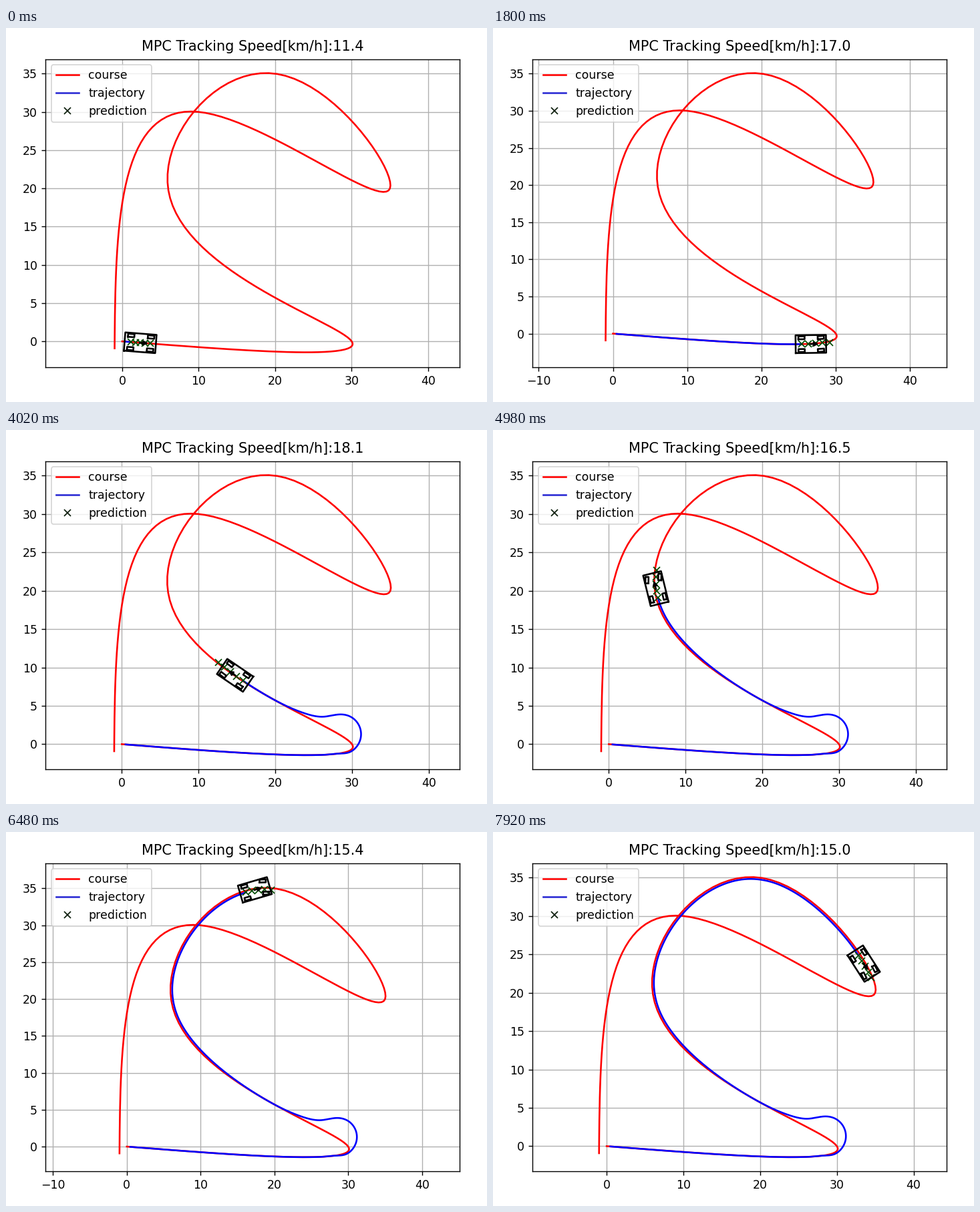
These frames come from a looping animation (720x560 px, 8 s). A matplotlib script:

```python
import numpy as np
import matplotlib.pyplot as plt
from matplotlib.animation import FuncAnimation

W, H, DPI = 720, 560, 125
LOOP, INTERVAL, STEP = 8000, 40, 60


def spline(points):
    """Natural cubic spline over the chord length; returns its length and evaluator."""
    p = np.asarray(points, float)
    h = np.hypot(*np.diff(p, axis=0).T)
    t = np.r_[0, np.cumsum(h)]
    n = len(p)
    a, b = np.eye(n), np.zeros((n, 2))
    slope = np.diff(p, axis=0) / h[:, None]
    for i in range(1, n - 1):
        a[i, i - 1:i + 2] = h[i - 1], 2 * (h[i - 1] + h[i]), h[i]
        b[i] = 6 * (slope[i] - slope[i - 1])
    m = np.linalg.solve(a, b)

    def at(s):
        i = np.clip(np.searchsorted(t, s) - 1, 0, n - 2)
        u, k = (s - t[i])[:, None], h[i][:, None]
        w = k - u
        bend = u * w / 6 * (m[i] * (1 + w / k) + m[i + 1] * (1 + u / k))
        return p[i] + slope[i] * u - bend

    return t[-1], at


# Reference course
length, course_at = spline([(0, 0), (30, 0), (6, 20), (20, 35),
                            (35, 20), (10, 30), (-1, -2)])
course = course_at(np.arange(0, length, 1.0))


def inside(s, gap):
    """Course points shifted to the right by gap."""
    d = course_at(s + 0.05) - course_at(s - 0.05)
    d /= np.hypot(*d.T)[:, None]
    return course_at(s) + gap[:, None] * np.c_[d[:, 1], -d[:, 0]]


# Driven path: along the course, a wide arc at the hairpin, then slightly inside
angle = np.radians(np.linspace(-65, 90, 7))
arc = np.array([28.6, 1.3]) + 2.58 * np.c_[np.cos(angle), np.sin(angle)]
s = np.arange(44, 110, 3.0)
ramp = np.clip((s - 44) / 12, 0, 1)
span, path_at = spline(np.vstack([course_at(np.arange(0.3, 23, 2)), arc,
                                  [(26.3, 3.58), (23.9, 4.0)],
                                  inside(s, 0.24 * ramp * ramp * (3 - 2 * ramp))]))
path = path_at(np.linspace(0, span, 4000))
dist = np.r_[0, np.cumsum(np.hypot(*np.diff(path, axis=0).T))]
yaw = np.unwrap(np.arctan2(*np.gradient(path, axis=0).T[::-1]))
bend = np.gradient(yaw, dist)

# Time in ms, cruising speed in km/h, place of the rear axle
KEYS = np.array([(0, 11.4, 1.13, -0.05), (900, 20.1, 11.38, -0.85),
                 (2700, 19, 30.77, 2.79), (4020, 18.1, 15.84, 8.36),
                 (6000, 14.9, 11.11, 31.73), (6960, 15.9, 21.99, 34.25),
                 (7920, 15.0, 32.97, 24.94)])
key_t, key_v = KEYS[:, 0], KEYS[:, 1]


def speed(t):
    """Cruising speed, with braking and recovery around the hairpin."""
    return np.minimum(np.interp(t, key_t, key_v), 7.59 + 0.0105 * np.abs(t - 2700))


clock = np.arange(0, LOOP + 1, 20)
travel = np.cumsum(speed(clock))
key_travel = np.interp(key_t, clock, travel)
key_dist = [dist[np.argmin(np.hypot(*(path - q).T))] for q in KEYS[:, 2:]]

# Vehicle, with the rear axle at the origin
LEN, WIDTH, BACK, BASE, TREAD = 4.1, 2.4, 0.8, 2.6, 0.86


def box(x0, x1, y0, y1):
    return np.array([(x0, y0), (x1, y0), (x1, y1), (x0, y1), (x0, y0)])


def rotate(p, a):
    c, s = np.cos(a), np.sin(a)
    return p @ np.array([(c, s), (-s, c)])


BODY = box(-BACK, LEN - BACK, -WIDTH / 2, WIDTH / 2)
WHEEL = box(-0.42, 0.42, -0.2, 0.2)
SHAFT = np.array([(1.2, 0), (1.8, 0)])
HEAD = np.array([(1.6, 0.28), (2.15, 0), (1.6, -0.28)])
GAP = np.full((1, 2), np.nan)


def car_lines(steer):
    parts = [BODY, GAP, SHAFT]
    for side in (-TREAD, TREAD):
        parts += [GAP, WHEEL + (0, side), GAP, rotate(WHEEL, steer) + (BASE, side)]
    return np.vstack(parts)


plt.rcParams.update({"font.family": "DejaVu Sans", "font.size": 10})
fig = plt.figure(figsize=(W / DPI, H / DPI), dpi=DPI, facecolor="white")
X0, X1, Y0, Y1 = 59, 679, 46.6, 507.8
ax = fig.add_axes([X0 / W, 1 - Y1 / H, (X1 - X0) / W, (Y1 - Y0) / H])
ax.grid(True)
ax.set_yticks(range(0, 36, 5))
ax.plot(*course.T, "-r", label="course")
trail, = ax.plot([], [], "-b", label="trajectory")
ahead, = ax.plot([], [], "x", color="#004a00", label="prediction")
car, = ax.plot([], [], "-k")
head, = ax.fill(*HEAD.T, color="k", lw=1, zorder=3)
title = ax.set_title("", pad=7)
legend = ax.legend(loc="upper left")
legend.legend_handles[1].set_color("#2a2ad4")
legend.legend_handles[2].set_markeredgecolor("#0c1e0c")


def on_path(d):
    return np.c_[np.interp(d, dist, path[:, 0]), np.interp(d, dist, path[:, 1])]


def fit_view(points):
    """Equal scale on both axes, with a margin above and below."""
    low, high = np.nanmin(points, axis=0), np.nanmax(points, axis=0)
    pad = 0.05 * (high[1] - low[1])
    bottom, top = low[1] - pad, high[1] + pad
    half = (top - bottom) * (X1 - X0) / (Y1 - Y0) / 2
    mid = (low[0] + high[0]) / 2
    ax.set_xticks(range(-10 if mid - half < -10.15 else 0, 41, 10))
    ax.set_xlim(mid - half, mid + half)
    ax.set_ylim(bottom, top)


def draw(frame):
    t = (frame + 0.5) * INTERVAL // STEP * STEP
    v = speed(t)
    d = np.interp(np.interp(t, clock, travel), key_travel, key_dist)
    pos, a = on_path(d), np.interp(d, dist, yaw)
    steer = np.clip(np.arctan(BASE * np.interp(d, dist, bend)), -np.pi / 4, np.pi / 4)

    driven = np.vstack([path[dist < d], pos])
    lines = rotate(car_lines(steer), a) + pos
    trail.set_data(*driven.T)
    ahead.set_data(*on_path(d + v / 18 * np.arange(5)).T)
    car.set_data(*lines.T)
    head.set_xy(rotate(HEAD, a) + pos)
    title.set_text("MPC Tracking Speed[km/h]:" + f"{v:.6f}"[:4])
    fit_view(np.vstack([course, driven, lines]))
    return trail, ahead, car, head, title


anim = FuncAnimation(fig, draw, frames=LOOP // INTERVAL, interval=INTERVAL,
                     repeat=True, repeat_delay=0, cache_frame_data=False)
plt.show()
```
